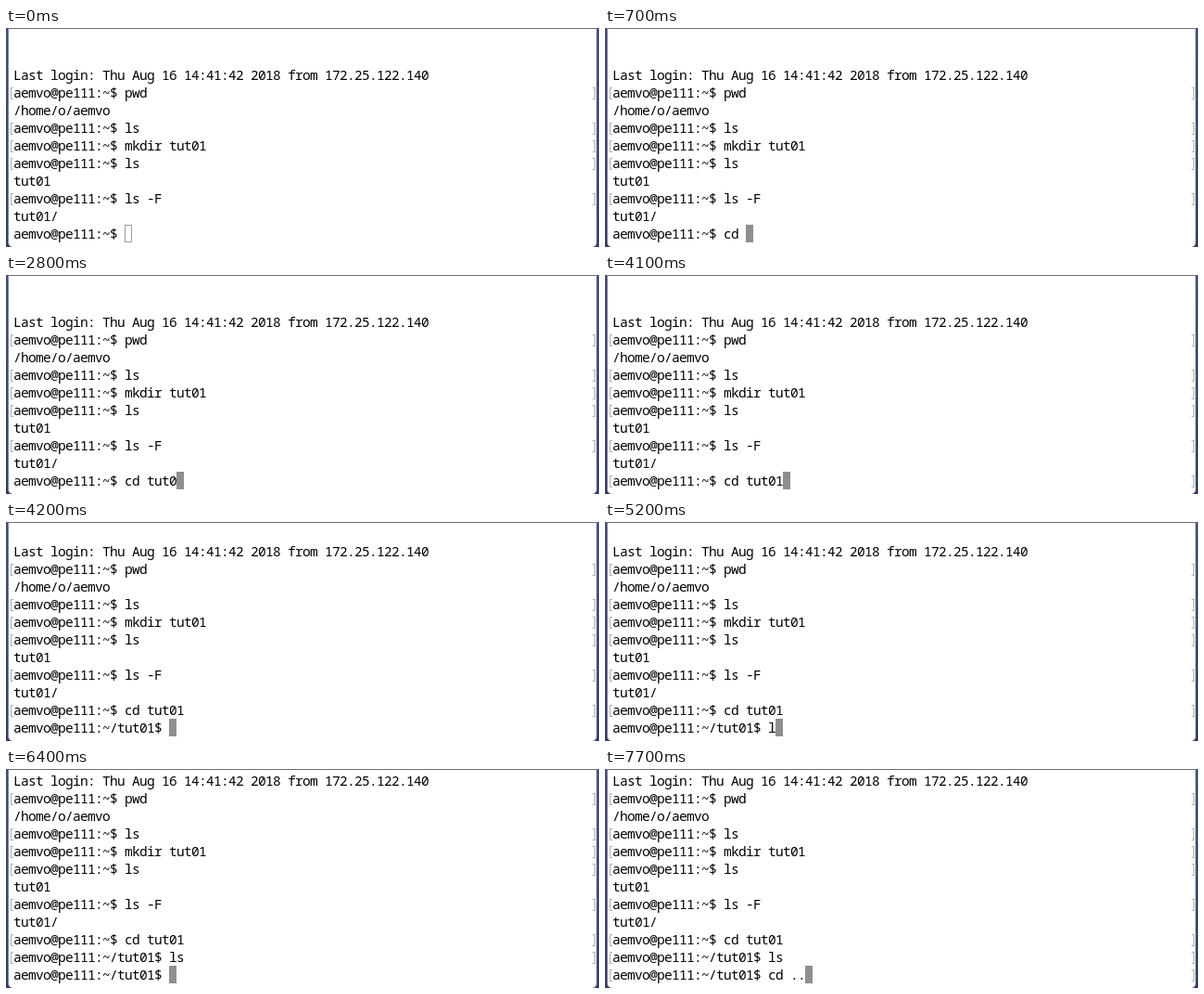
Animation of 640 by 236 pixels, one loop 8 s. Source, as an HTML page:

```html
<!DOCTYPE html>
<html lang="en">
<head>
<meta charset="utf-8">
<title>Terminal session</title>
<style>
  html, body { margin: 0; width: 100%; height: 100%; overflow: hidden; }
  #stage {
    position: relative; width: 640px; height: 236px; overflow: hidden;
    background: linear-gradient(#424d76, #39436d 60%, #323a5f);
  }
  #window {
    position: absolute; left: 2px; top: 0; width: 636px; height: 236px;
    box-sizing: border-box; border: 1px solid #7f87a4;
    border-top-color: #6c6c72; border-bottom: 0;
    border-radius: 0 0 5px 5px; background: #fff;
  }
  #screen { position: absolute; left: 0; width: 640px; }
  .row {
    position: relative; height: 19px; padding-left: 8px; white-space: pre;
    font: 500 14.5px/19px "Noto Sans Mono", monospace;
    letter-spacing: -0.7px;
    font-variant-ligatures: none; color: #000;
  }
  .mark::before, .mark::after {
    content: ""; position: absolute; top: 4px; width: 2px; height: 11px;
    border: 1px solid #b0b0b0;
  }
  .mark::before { left: 5px; border-right: 0; }
  .mark::after { left: 633px; border-left: 0; }
  .cursor {
    position: absolute; top: 0; width: 8px; height: 19px;
    box-sizing: border-box; background: #8f8f8f;
  }
  .idle .cursor { background: none; border: 1px solid #9c9c9c; }
</style>
</head>
<body>
<div id="stage">
  <div id="window"></div>
  <div id="screen"></div>
</div>
<script>
const LOOP = 8000, ROW = 19, CELL = 8, FIRST_TOP = 41, VISIBLE = 10;
const FOCUS_AT = 200;
const user = "aemvo";
const prompt = dir => `${user}@pe111:${dir}$ `;
const line = (text, mark = false) => ({ text, mark });
const entered = command => line(prompt("~") + command, true);

const history = [
  line("Last login: Thu Aug 16 14:41:42 2018 from 172.25.122.140"),
  entered("pwd"),
  line(`/home/o/${user}`),
  entered("ls"),
  entered("mkdir tut01"),
  entered("ls"),
  line("tut01"),
  entered("ls -F"),
  line("tut01/"),
  line(prompt("~"))
];

const type = text => lines => { lines.at(-1).text += text; };
const enter = lines => { lines.at(-1).mark = true; };
const newPrompt = lines => { lines.push(line(prompt("~/tut01"))); };

const steps = [
  [500, type("c")], [600, type("d")], [700, type(" ")], [1200, type("t")],
  [2200, type("u")], [2700, type("t")], [2800, type("0")], [3000, type("1")],
  [3900, enter], [4200, newPrompt],
  [5200, type("l")], [5300, type("s")],
  [6300, enter], [6400, newPrompt],
  [7300, type("cd ")], [7500, type(".")], [7600, type(".")], [7700, enter]
];

const screen = document.getElementById("screen");
let shown = "";

function draw(time) {
  const due = steps.filter(([at]) => at <= time);
  const idle = time < FOCUS_AT;
  const key = `${due.length} ${idle}`;
  if (key === shown) return;
  shown = key;

  const lines = history.map(item => ({ ...item }));
  due.forEach(([, apply]) => apply(lines));

  screen.className = idle ? "idle" : "";
  screen.style.top = `${FIRST_TOP - (lines.length - VISIBLE) * ROW}px`;
  screen.replaceChildren(...lines.map(({ text, mark }) => {
    const row = document.createElement("div");
    row.className = mark ? "row mark" : "row";
    row.textContent = text;
    return row;
  }));

  const cursor = document.createElement("span");
  cursor.className = "cursor";
  cursor.style.left = `${(lines.at(-1).text.length + 1) * CELL}px`;
  screen.lastChild.append(cursor);
}

const start = performance.now();
function tick() {
  draw((performance.now() - start) % LOOP);
  requestAnimationFrame(tick);
}
tick();
</script>
</body>
</html>
```
